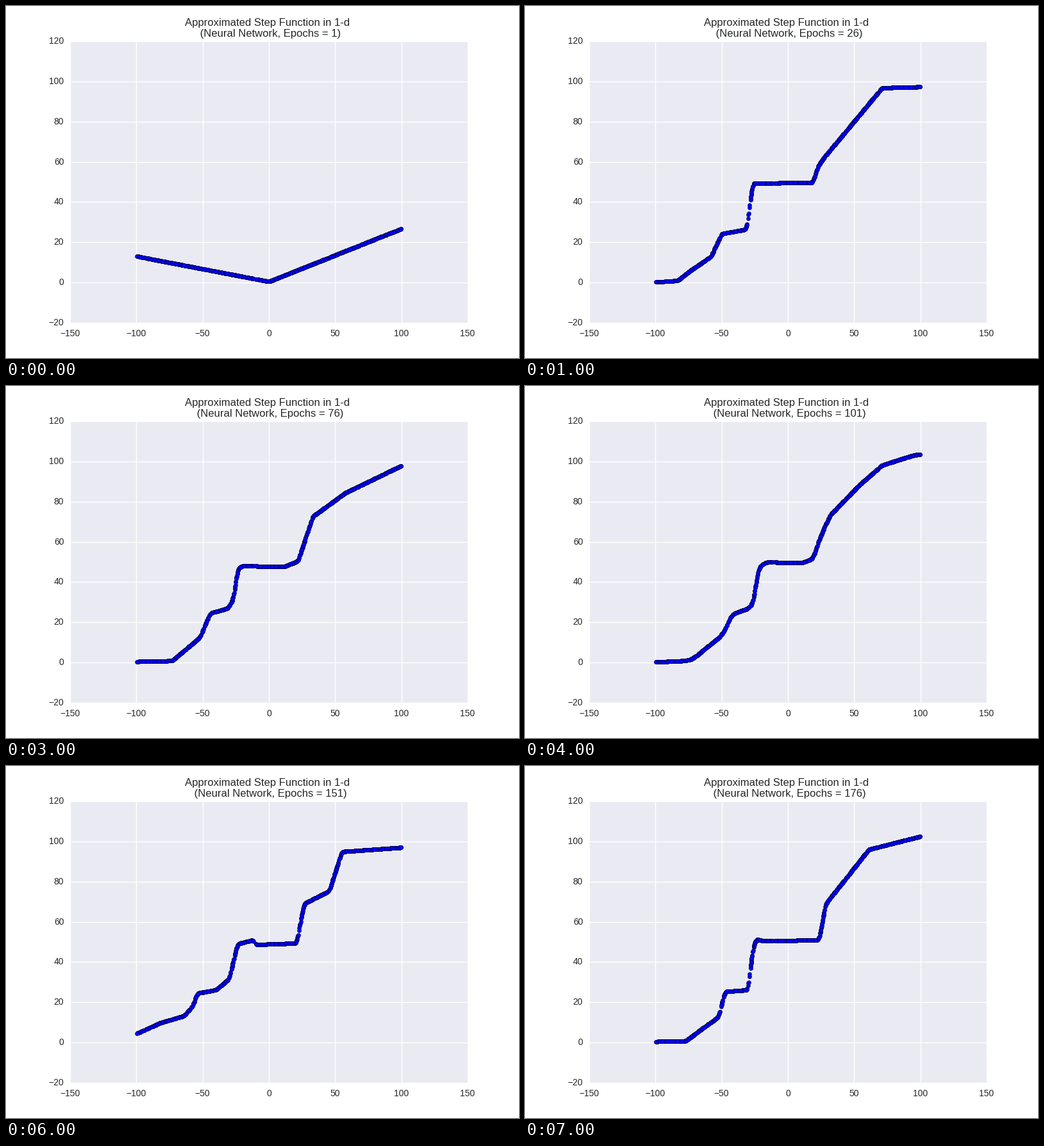
A matplotlib script for the animation above (8 s loop, 800 by 550 pixels).

```python
import numpy as np
import matplotlib.pyplot as plt
from matplotlib.animation import FuncAnimation

plt.rcParams.update({"font.family": "Liberation Sans",
                     "text.kerning_factor": 6})
INK = "#262626"
STEP = 25       # epochs between pictures
ROUNDING = 1.2  # half-width over which corners are softened

# Corners of the learned function at each epoch
CORNERS = {
    1: [(-100, 13.1), (0, .5), (100, 26.8)],
    26: [(-100, .2), (-83, 1), (-75, 5.3), (-58, 13), (-50, 24.3),
         (-31.3, 26.5), (-26.6, 49.3), (18.8, 49.8), (22.5, 57.5), (27, 62),
         (71, 96.8), (100, 97.3)],
    76: [(-100, .5), (-73, .9), (-52, 12.6), (-44.5, 24.5), (-31, 27),
         (-27, 31.5), (-23.5, 46.8), (-20, 48), (12, 47.8), (22, 50.5),
         (33, 72.6), (58, 84.5), (100, 97.9)],
    126: [(-100, 0), (-78, 1), (-69, 3.5), (-60, 8.5), (-47, 14.5),
          (-39.5, 24), (-26.1, 27.7), (-20.3, 49.3), (-17.5, 52), (7, 51.2),
          (15.8, 52.8), (20, 61.5), (26, 69.5), (64, 105.4), (100, 109.4)],
    151: [(-100, 4.4), (-82, 9.8), (-64, 13.3), (-57.5, 18.3), (-54, 24.5),
          (-40, 26.2), (-30, 31.7), (-23.8, 49), (-12, 51), (-10, 48.7),
          (20.8, 49.4), (26.5, 69), (45.5, 75.4), (55, 94.9), (100, 97)],
    176: [(-100, .5), (-77, .8), (-64, 7.3), (-52.5, 12.7), (-47.5, 25.3),
          (-30.3, 26.2), (-26.5, 46.5), (-24, 51.4), (-18, 50.5),
          (23.5, 51), (28.5, 69), (61, 96), (100, 102.5)],
}


def halfway(a, b):
    """Mean of two curves, pairing points of equal x + y to keep steps steep."""
    s = np.linspace(-100, 210, 1500)
    paths = [[np.interp(s, k.sum(1), axis) for axis in k.T]
             for k in (np.array(a, float), np.array(b, float))]
    return np.mean(paths, axis=0).T


def curve(corners, x):
    """Straight runs between corners, with the corners rounded off."""
    kx, ky = np.transpose(corners)
    shifts = np.linspace(-ROUNDING, ROUNDING, 9)
    return np.mean([np.interp(x + d, kx, ky) for d in shifts], axis=0)


for epoch in (51, 101):
    CORNERS[epoch] = halfway(CORNERS[epoch - STEP], CORNERS[epoch + STEP])

x = np.random.default_rng(4).uniform(-99.6, 99.8, 1000)

fig = plt.figure(figsize=(8, 5.5), dpi=100, facecolor="white")
ax = fig.add_axes([.125, .1, .775, .8], facecolor="#EAEAF2")
ax.set(xlim=(-150, 150), ylim=(-20, 120))
ax.set_xticks(range(-150, 151, 50))
ax.set_yticks(range(-20, 121, 20))
ax.tick_params(length=0, pad=7, labelsize=10, labelcolor=INK)
plt.setp(ax.get_yticklabels(), va="center")
ax.grid(color="white", linewidth=1, linestyle="-")
ax.set_axisbelow(True)
ax.spines[:].set_visible(False)

title = ax.set_title("", fontsize=12, color=INK, pad=5)
dots = ax.scatter(x, x, s=20, c="blue", edgecolors="black",
                  linewidths=.3, zorder=3)


def draw(i):
    epoch = 1 + STEP * i
    title.set_text("Approximated Step Function in 1-d \n"
                   f" (Neural Network, Epochs = {epoch})")
    dots.set_offsets(np.column_stack([x, curve(CORNERS[epoch], x)]))
    return title, dots


anim = FuncAnimation(fig, draw, frames=len(CORNERS), interval=1000,
                     repeat=True, repeat_delay=0)
plt.show()
```
